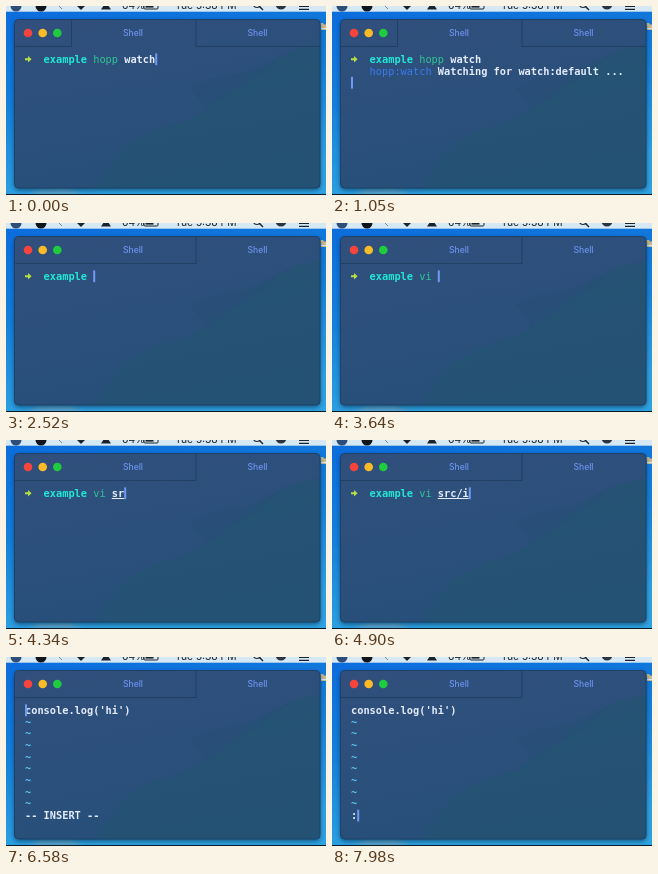
These frames come from a looping animation (320x189 px, 8000 ms). An HTML page:

```html
<!DOCTYPE html>
<html lang="en">
<head>
<meta charset="utf-8">
<title>Terminal session</title>
<style>
html, body { margin: 0; width: 100%; height: 100%; overflow: hidden; background: #1b8fdb; }
svg { display: block; width: 320px; height: 189px; }
text { white-space: pre; }
.ui { font-family: Inter, "Liberation Sans", sans-serif; }
.tab { font-size: 8.6px; font-weight: 500; fill: #6d92f0; text-anchor: middle; }
.menu { font-size: 10.3px; fill: #1c2229; }
#screen text { font: 10.3px "DejaVu Sans Mono", monospace; }
#screen .b { font-weight: bold; }
</style>
</head>
<body>
<svg viewBox="0 0 320 189">
  <defs>
    <linearGradient id="sky" x2=".25" y2="1">
      <stop offset="0" stop-color="#0b6cdd"/>
      <stop offset=".5" stop-color="#1580da"/>
      <stop offset="1" stop-color="#2fa3e2"/>
    </linearGradient>
    <linearGradient id="glass" x2=".35" y2="1">
      <stop offset="0" stop-color="#314f7c"/>
      <stop offset=".55" stop-color="#2b507b"/>
      <stop offset="1" stop-color="#274f79"/>
    </linearGradient>
    <filter id="soft"><feGaussianBlur stdDeviation="2"/></filter>
    <filter id="edge"><feGaussianBlur stdDeviation=".7"/></filter>
    <clipPath id="frame"><rect x="8.5" y="13.5" width="305.5" height="168.5" rx="4"/></clipPath>
  </defs>

  <rect width="320" height="189" fill="url(#sky)"/>
  <path d="M22 189L34 183L62 182L78 189Z" fill="#7fa9bd" opacity=".6" filter="url(#soft)"/>
  <rect y="188" width="320" height="1" fill="#0c1a26"/>
  <path d="M314.500 17H317L318 18.500H320V24H315Z" fill="#cbb98a"/>
  <rect x="315" y="22" width="5" height="1" fill="#d5e8f5"/>

  <!-- menu bar -->
  <rect width="320" height="5.700" fill="#d6e8f4"/>
  <circle cx="10" cy="0" r="5.500" fill="#2c4e78"/>
  <circle cx="35" cy="0" r="5.500" fill="#10151b"/>
  <path d="M71 0H79L75 4Z M95 3.500L100 -4L105 3.500Z" fill="#1c2229"/>
  <path d="M53 0L56 3" stroke="#7d8891"/>
  <text class="ui menu" x="116" y="2.800">64%</text>
  <rect x="138" y="-4" width="14" height="7" rx="1" fill="none" stroke="#1c2229"/>
  <rect x="139.500" y="-3" width="8" height="4.600" fill="#1c2229"/>
  <text class="ui menu" x="169" y="2.800">Tue 5:38 PM</text>
  <circle cx="251" cy="-2" r="3.500" fill="none" stroke="#1c2229" stroke-width="1.200"/>
  <path d="M253.500 .5L257 4" stroke="#1c2229" stroke-width="1.400"/>
  <circle cx="275" cy="-2" r="5.500" fill="#2b3340"/>
  <path d="M293 .3H303M293 3.300H303" stroke="#1c2229" stroke-width="1.300"/>

  <!-- window -->
  <rect x="8" y="15" width="306.500" height="169.500" rx="5" fill="#06233f" opacity=".55" filter="url(#soft)"/>
  <g clip-path="url(#frame)">
    <rect x="8" y="13" width="307" height="170" fill="url(#glass)"/>
    <path d="M84 190L120 140L150 124L184 114L200 104L224 88L240 70L285 45L320 36V190Z" fill="#245573" opacity=".7" filter="url(#edge)"/>
    <path d="M184 82L205 72L240 66L285 45L250 72L220 90L200 104Z" fill="#284f77" opacity=".5" filter="url(#edge)"/>
  </g>
  <rect x="8.500" y="13.500" width="305.500" height="168.500" rx="4" fill="none" stroke="#1f3f63" stroke-width=".9"/>
  <path id="edges" fill="none" stroke="#213e61" stroke-width=".9"/>
  <circle cx="22" cy="27" r="4.300" fill="#f8443c"/>
  <circle cx="36.700" cy="27" r="4.300" fill="#fbbb24"/>
  <circle cx="51.300" cy="27" r="4.300" fill="#1fcc40"/>
  <text class="ui tab" x="127" y="29.600">Shell</text>
  <text class="ui tab" x="251.500" y="29.600">Shell</text>
  <g id="screen"></g>
</svg>
<script>
const LOOP = 8000, X0 = 19, Y0 = 56.8, COL = 6.2, ROW = 11.7;
const WHITE = '#e4ecfb', CYAN = '#22e8d6', GREEN = '#33c596', BLUE = '#3a7cee',
      RED = '#e8625f', TILDE = '#5cc4f0', CURSOR = '#6f9af4';
const ENTER = 280, OUTPUT = 560, SWITCH = 1890, OPEN_FILE = 5740, EDITOR = 5950,
      INSERT = 6580, ESCAPE = 7350, COLON = 7840;

// [time, command line in the second tab]
const keys = [
  [SWITCH, ''], [2940, 'v'], [3080, 'vi'], [3570, 'vi '], [4130, 'vi s'],
  [4270, 'vi sr'], [4410, 'vi src'], [4550, 'vi src/'], [4760, 'vi src/i'],
  [4970, 'vi src/in'], [5250, 'vi src/index.js ']
];
const screen = document.getElementById('screen');
const edges = document.getElementById('edges');

const x = col => X0 + col * COL;
const y = row => Y0 + row * ROW;

function word(col, row, str, color, bold = true) {
  return `<text x="${x(col)}" y="${y(row)}" fill="${color}"${bold ? ' class="b"' : ''}>${str}</text>`;
}

function underline(col, row, len) {
  return `<rect x="${x(col)}" y="${y(row) + 1.2}" width="${len * COL}" height="1" fill="${WHITE}"/>`;
}

function cursor(col, row) {
  return `<rect x="${x(col)}" y="${y(row) - 9.4}" width="2" height="11.8" fill="${CURSOR}"/>`;
}

function prompt() {
  return '<path d="M19 52.300H22V50L25.600 53.300L22 56.600V54.300H19Z" fill="#b9de42"/>' +
    word(3, 0, 'example', CYAN);
}

function watchTab(t) {
  const out = prompt() + word(11, 0, 'hopp', GREEN, false) + word(16, 0, 'watch', WHITE);
  if (t < ENTER) return out + cursor(21, 0);
  if (t < OUTPUT) return out + cursor(0, 1);
  return out + word(3, 1, 'hopp:watch', BLUE, false) +
    word(14, 1, 'Watching for watch:default ...', WHITE) + cursor(0, 2);
}

function shellTab(t) {
  const line = keys.filter(k => k[0] <= t).pop()[1];
  const cmd = line.slice(0, 2), path = line.slice(3).trim();
  let out = prompt();
  if (cmd) out += word(11, 0, cmd, cmd === 'vi' ? GREEN : RED, cmd !== 'vi');
  if (path) out += word(14, 0, path, WHITE) + underline(14, 0, path.length);
  return out + (t < OPEN_FILE ? cursor(11 + line.length, 0) : cursor(0, 1));
}

function editor(t) {
  let out = word(0, 0, "console.log('hi')", WHITE);
  for (let row = 1; row < 9; row++) out += word(0, row, '~', TILDE);
  if (t >= COLON) return out + word(0, 9, ':', WHITE) + cursor(1, 9);
  if (t >= INSERT && t < ESCAPE) out += word(0, 9, '-- INSERT --', WHITE);
  return out + cursor(0, 0);
}

let shown = '';
function draw(t) {
  const first = t < SWITCH;
  const html = first ? watchTab(t) : t < EDITOR ? shellTab(t) : editor(t);
  if (html === shown) return;
  shown = html;
  screen.innerHTML = html;
  edges.setAttribute('d', first
    ? 'M8.5 40.5H65.5V14M314 40.5H190V14'
    : 'M8.5 40.5H190V14');
}

const start = performance.now();
function tick() {
  draw((performance.now() - start) % LOOP);
  requestAnimationFrame(tick);
}
draw(0);
requestAnimationFrame(tick);
</script>
</body>
</html>
```
